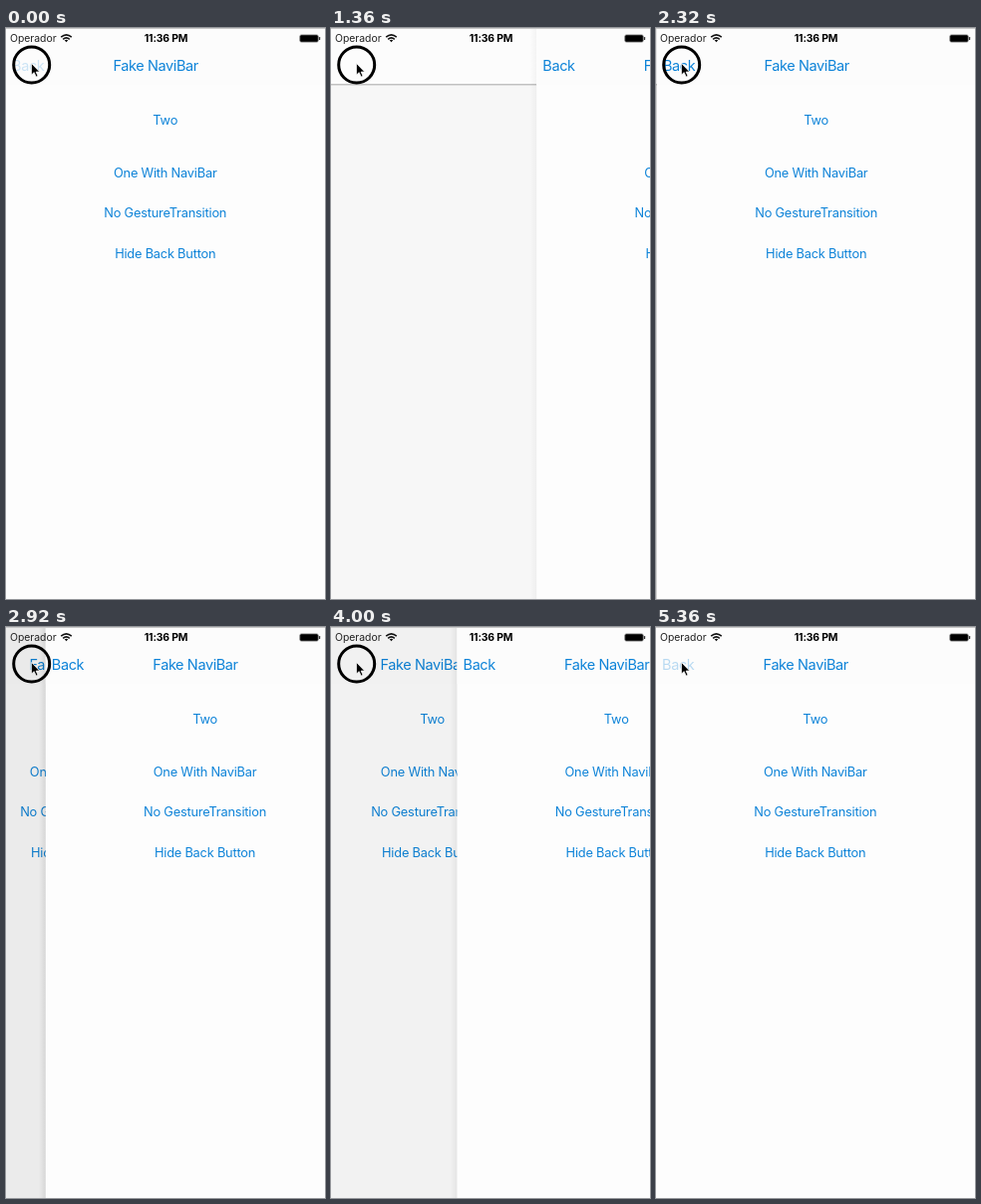
An HTML page for the animation above (5.4 s loop, 320 by 573 pixels).

```html
<!DOCTYPE html>
<html lang="en">
<head>
<meta charset="utf-8">
<title>Navigation transitions</title>
<style>
  html, body { margin: 0; width: 100%; height: 100%; overflow: hidden; background: #fdfdfd; }
  svg { display: block; width: 100vw; height: 100vh; }
  text { font-family: Inter, Roboto, "Liberation Sans", sans-serif; }
  .link { font-size: 12.8px; letter-spacing: -.2px; fill: #0d83d8; }
  .bar-text { font-size: 14.5px; letter-spacing: -.4px; fill: #0d83d8; }
  .action { font-size: 15px; letter-spacing: -.25px; fill: #d8291c; }
  .status { font-size: 10.4px; fill: #222; }
  .clock { font-weight: 700; letter-spacing: -.15px; fill: #000; }
</style>
</head>
<body>
<svg viewBox="0 0 320 573" preserveAspectRatio="none">
  <defs>
    <linearGradient id="edge">
      <stop offset="0" stop-color="#000" stop-opacity="0"/>
      <stop offset="1" stop-color="#000" stop-opacity=".1"/>
    </linearGradient>
    <g id="menu">
      <rect width="320" height="573" fill="#fdfdfd"/>
      <rect width="320" height="57" fill="#fcfcfc"/>
      <text class="bar-text" x="107.5" y="43">Fake NaviBar</text>
      <g class="link" text-anchor="middle">
        <text x="159.700" y="96.500">Two</text>
        <text x="159.700" y="149.500">One With NaviBar</text>
        <text x="159.700" y="190">No GestureTransition</text>
        <text x="159.700" y="231">Hide Back Button</text>
      </g>
    </g>
  </defs>

  <rect width="320" height="573" fill="#fdfdfd"/>
  <use id="under" href="#menu"/>
  <rect id="dim" width="320" height="573"/>
  <g id="homeBar">
    <rect width="320" height="57" fill="#fcfcfc"/>
    <rect y="56.200" width="320" height="1.200" fill="#b4b4b4"/>
    <text class="action" x="12.5" y="43.300">Click Here</text>
  </g>
  <g id="page">
    <rect id="shadow" x="-7" width="7" height="573" fill="url(#edge)"/>
    <use href="#menu"/>
    <text id="back" class="bar-text" x="6" y="43">Back</text>
  </g>

  <rect width="320" height="1" fill="#c8c8c8"/>
  <text class="status" x="4" y="14">Operador</text>
  <g fill="none" stroke="#111" stroke-width="1.6">
    <path d="M55.200 9.200Q60.500 4.600 65.800 9.200M57.200 11.300Q60.500 8.500 63.800 11.300"/>
    <path d="M60.500 14.200L58.700 12.300Q60.500 11 62.300 12.300Z" fill="#111" stroke="none"/>
  </g>
  <text class="status clock" x="160.500" y="14" text-anchor="middle">11:36 PM</text>
  <rect x="294.800" y="6.900" width="18.400" height="7.200" rx="1.500" stroke="#777" stroke-width=".8"/>
  <rect x="313.900" y="9" width="1.300" height="3" rx=".6" fill="#333"/>

  <circle id="press" cx="25.700" cy="37" r="18" fill="none" stroke="#000" stroke-width="3"/>
  <path d="M25.500 35.500V47L28.200 44.600L30.200 49L32 48.200L30.100 44H33.700Z" stroke="#fff" stroke-width=".7"/>
</svg>
<script>
  const LOOP = 5400, WIDTH = 320, PARALLAX = 0.3, DECAY = 180;
  const moves = [
    { start: 40, pop: true, home: true },
    { start: 1282, home: true },
    { start: 2546 },
    { start: 3834 }
  ];
  const presses = [[0, 480], [1160, 4560]];

  const el = id => document.getElementById(id);
  const parts = Object.fromEntries(
    ["under", "dim", "homeBar", "page", "shadow", "back", "press"].map(id => [id, el(id)]));
  const shift = (node, x) => node.setAttribute("transform", `translate(${x.toFixed(2)} 0)`);
  const show = (node, on) => node.setAttribute("visibility", on ? "visible" : "hidden");
  const clamp = v => Math.min(1, Math.max(0, v));

  // The Back button dims on touch and recovers once the page starts to leave.
  function backOpacity(t) {
    if (t > 5240) return 1 - 0.72 * clamp((t - 5240) / 100);
    if (t < 40) return 0.2;
    return 0.2 + 0.8 * clamp((t - 40) / 400);
  }

  function draw(t) {
    const clock = t < moves[0].start ? t + LOOP : t;
    const move = moves.filter(m => m.start <= clock).pop();
    const rest = WIDTH * Math.exp(-(clock - move.start) / DECAY);
    const x = move.pop ? WIDTH - rest : rest;
    const covered = 1 - x / WIDTH;

    shift(parts.page, x);
    shift(parts.under, -WIDTH * PARALLAX * covered);
    shift(parts.homeBar, x - WIDTH);
    show(parts.under, !move.home);
    show(parts.homeBar, move.home);
    parts.dim.setAttribute("opacity", 0.083 * covered ** 1.3);
    parts.shadow.setAttribute("opacity", covered);
    parts.back.setAttribute("opacity", backOpacity(t));
    show(parts.press, presses.some(([from, to]) => t >= from && t < to));
  }

  const origin = performance.now();
  function tick() {
    draw((performance.now() - origin) % LOOP);
    requestAnimationFrame(tick);
  }
  tick();
</script>
</body>
</html>
```
